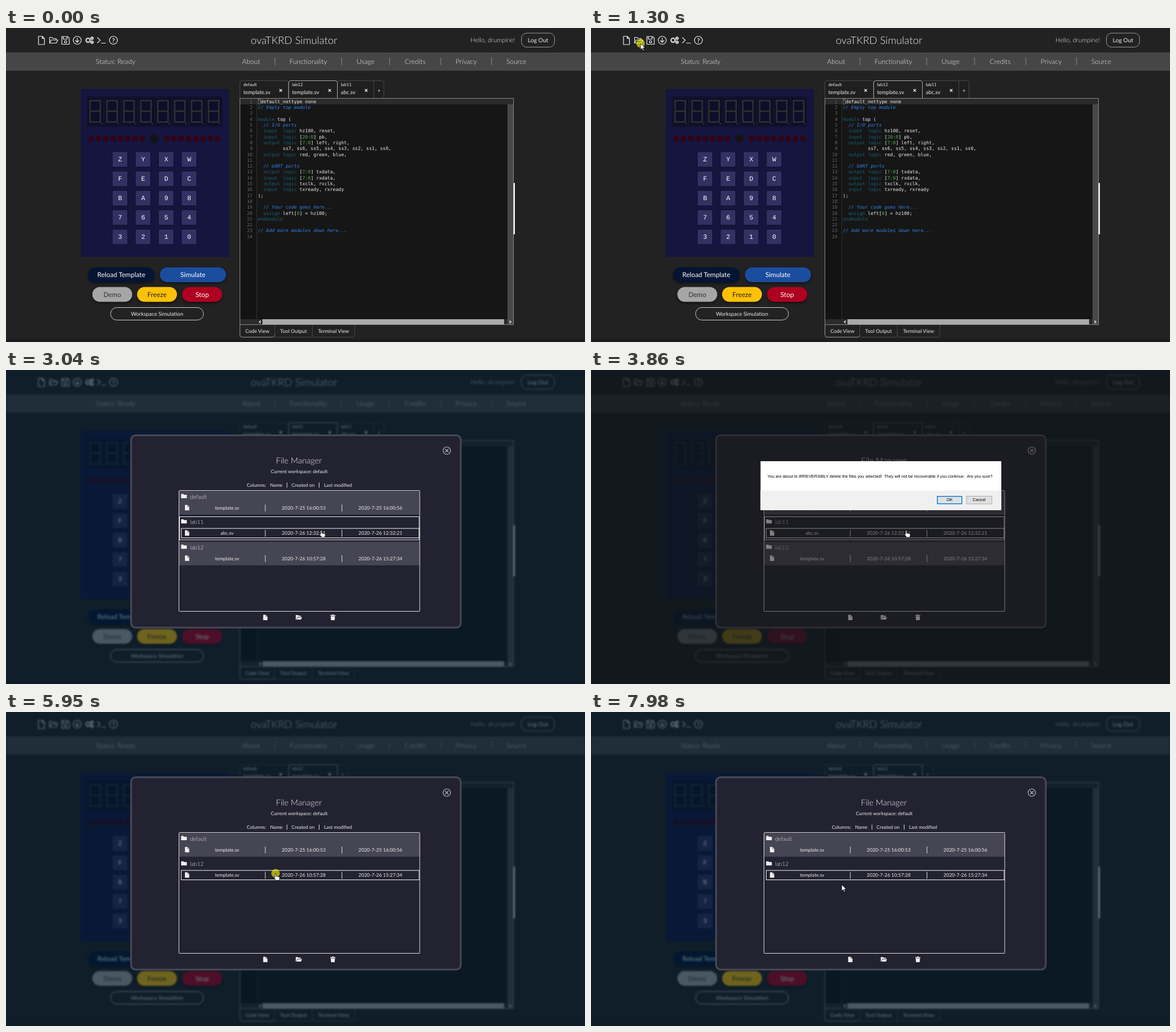
Animation, 1016 px wide and 551 px high, one loop 8000 ms. Source, as an HTML page:

```html
<!DOCTYPE html>
<html lang="en">
<head>
<meta charset="utf-8">
<title>Simulator file manager</title>
<style>
  html, body { margin: 0; width: 100%; height: 100%; overflow: hidden; background: #222; }
  svg { position: absolute; left: 0; top: 0; width: 1016px; height: 551px; }
  text { font-family: Lato, sans-serif; white-space: pre; text-rendering: geometricPrecision; }
  .code text { font: 8.1px "DejaVu Sans Mono", monospace; }
  .key text { font-family: "Liberation Mono", monospace; }
  .dialog text { font-family: "Liberation Sans", sans-serif; }
  .shadow { filter: drop-shadow(0 2px 2px rgba(0, 0, 0, .55)); }
  .line { fill: none; stroke: #eee; stroke-width: 1.2; stroke-linejoin: round; stroke-linecap: round; }
</style>
</head>
<body>
<svg id="page" viewBox="0 0 1016 551"></svg>
<svg id="top" viewBox="0 0 1016 551"></svg>
<script>
const $ = id => document.getElementById(id);
const range = (n, fn) => Array.from({ length: n }, (_, i) => fn(i)).join('');

// Drawing helpers
const rect = (x, y, w, h, fill, more = '') =>
  `<rect x="${x}" y="${y}" width="${w}" height="${h}" fill="${fill}" ${more}/>`;
const frame = (x, y, w, h, stroke, r = 0) => rect(x, y, w, h, 'none', `stroke="${stroke}" rx="${r}"`);
const disc = (x, y, r, fill) => `<circle cx="${x}" cy="${y}" r="${r}" fill="${fill}"/>`;
const path = (d, more = '') => `<path d="${d}" ${more}/>`;
const text = (x, y, s, size, { w = 400, c = '#eee', a = 'start' } = {}) =>
  `<text x="${x}" y="${y}" font-size="${size}" font-weight="${w}" fill="${c}" text-anchor="${a}">${s}</text>`;
const mid = (x, y, s, size, c, w) => text(x, y, s, size, { a: 'middle', c, w });
const cross = (x, y, r) => path(`M${x - r} ${y - r}l${2 * r} ${2 * r}m0 ${-2 * r}l${-2 * r} ${2 * r}`,
  'stroke="#eee" stroke-width="1.3"');

function header() {
  const gear = (x, y, r) =>
    `<circle cx="${x}" cy="${y}" r="${r}"/><circle cx="${x}" cy="${y}" r="${r + 1.2}" stroke-dasharray="1.2 1.5"/>`;
  const icons = '<g class="line">' +
    path('M57 14.5h6.5l4 4v10.500h-10.500zM63.500 14.500v4h4') +
    path('M76.500 26.500v-10h4.500l1.500 2h5.500v2.500M76.500 26.500l3-5.500h11.500l-3 5.500z') +
    path('M98 15h10l3 3v10.500h-13zM100.500 15v4.500h6.500v-4.500') + '<circle cx="104.500" cy="24" r="2"/>' +
    '<circle cx="125" cy="21.500" r="7"/>' + path('M125 17.500v7.500m-3-3l3 3 3-3') +
    gear(144, 21.5, 3) + gear(151, 18, 1.3) + gear(151, 25, 1.3) +
    path('M160.500 17l5 4.500-5 4.500M167.500 26.500h7') +
    '<circle cx="188.500" cy="21.500" r="7"/></g>' + mid(188.5, 25.5, '?', 11, '#eee', 700);
  const nav = [['About', 430], ['Functionality', 530.5], ['Usage', 631], ['Credits', 718], ['Privacy', 807.5], ['Source', 895.5]];
  return rect(0, 0, 1016, 551, '#222') + rect(0, 43, 1016, 32, '#464646') + rect(0, 546, 1016, 5, '#1f1b20') + icons +
    mid(505.5, 28, 'ovaTKRD Simulator', 18.3, '#eee', 300) +
    text(815, 25, 'Hello, drumpine!', 11, { w: 300 }) +
    frame(904.5, 9, 58, 24.5, '#999', 9) + mid(933.5, 25.2, 'Log Out', 10.2) +
    text(157.5, 63, 'Status: Ready', 12, { w: 300 }) +
    nav.map(([s, x]) => mid(x, 63, s, 11.9, '#eee', 300)).join('') +
    [472, 589, 673, 763, 852].map(x => rect(x - .5, 52, 1, 13, '#8a8a8a')).join('');
}

function board() {
  const digit = i => {
    const x = 147.5 + i * 29.7;
    return rect(x - 4, 122, 28, 50, '#0e0e28', 'stroke="#17172f"') +
      path(`M${x} 127.500h18v37.500h-18zM${x} 146h18`, 'fill="none" stroke="#303034" stroke-width="2.500"') +
      disc(x + 20, 168, 1.4, '#303034');
  };
  const leds = x => range(8, i => disc(x + i * 12.8, 194, 5, '#360311'));
  const keys = range(20, i => {
    const x = 186.5 + (i % 4) * 40.4, y = 217 + Math.floor(i / 4) * 34;
    return rect(x, y, 27, 27, '#313163', 'stroke="#0c0c2c"') + mid(x + 13.8, y + 17.3, 'ZYXWFEDCBA9876543210'[i], 11.5, '#fff');
  });
  const pill = (x, y, w, fill, label, c = '#fff') =>
    rect(x, y, w, 26, fill, 'rx="13"') + mid(x + w / 2, y + 17.3, label, 11.7, c);
  return rect(131, 107, 260, 295, '#15153f') + rect(142, 120, 237, 53.5, '#0f0f2d') + range(8, digit) +
    leds(149.5) + disc(260, 194, 7, '#131313') + leds(282) +
    `<g class="key">${keys}</g><g class="shadow">` +
    pill(144, 420, 116.5, '#041533', 'Reload Template') + pill(270, 420, 116, '#1a4d9e', 'Simulate') +
    pill(151.5, 454.5, 70, '#a6a6a6', 'Demo', '#333') + pill(230, 454.5, 70, '#ffc107', 'Freeze', '#222') +
    pill(309, 454.5, 70.5, '#b00020', 'Stop') + '</g>' +
    frame(183.5, 490.5, 163, 22, '#ccc', 11) + mid(265, 505, 'Workspace Simulation', 9.4);
}

const source = `\`default_nettype none
// Empty top module

module top (
  // I/O ports
  input  logic hz100, reset,
  input  logic [20:0] pb,
  output logic [7:0] left, right,
         ss7, ss6, ss5, ss4, ss3, ss2, ss1, ss0,
  output logic red, green, blue,

  // UART ports
  output logic [7:0] txdata,
  input  logic [7:0] rxdata,
  output logic txclk, rxclk,
  input  logic txready, rxready
);

  // Your code goes here...
  assign left[0] = hz100;
endmodule

// Add more modules down here...
`.split('\n');

const colour = line => line.includes('//')
  ? `<tspan fill="#2e84ee" font-style="italic">${line}</tspan>`
  : line.replace(/\b(?:(module|endmodule|input|output|logic|assign)|\d+(?::\d+)?)\b/g,
      (s, word) => `<tspan fill="${word ? '#12627a' : '#4cb050'}">${s}</tspan>`);

function tab(x, w, dir, file, stroke) {
  return path(`M${x} 123v-27q0-3.500 3.500-3.500h${w - 7}q3.500 0 3.500 3.500v27`, `fill="#1f1f1f" stroke="${stroke}"`) +
    text(x + 6, 102.3, dir, 7.7) + text(x + 6, 115.8, file, 9.45) + cross(x + w - 13.5, 109.5, 2.2);
}
const plus = x => path(`M${x} 123v-30.500h14q3.500 0 3.500 3.500v27`, 'fill="#1f1f1f" stroke="#484848"') +
  mid(x + 9, 113, '+', 9);

function editor() {
  const views = [['Code View', 410.5, 61, '#999'], ['Tool Output', 471.5, 66, '#484848'], ['Terminal View', 537.5, 74.5, '#484848']];
  return tab(410.5, 85, 'default', 'template.sv', '#484848') +
    `<g id="extraTab">${tab(581.5, 64, 'lab11', 'abc.sv', '#484848')}${plus(645.5)}</g>` +
    `<g id="fewerTabs">${plus(581.5)}</g>` +
    tab(496, 85.5, 'lab12', 'template.sv', '#aaa') +
    rect(410.5, 123.5, 480, 397, '#161616', 'stroke="#888"') + rect(411, 124, 29, 387, '#131313') +
    rect(411, 124, 479, 10, '#2b2b2b') + rect(439.5, 124, 1, 387, '#333') +
    rect(880, 134, 10, 386, '#484848') + rect(411, 511, 469, 9, '#2b2b2b') + rect(450, 511, 424, 9, '#aaa') +
    path('M447 513.500l-2.500 2.200 2.500 2.200M883.500 513.500l2.500 2.200-2.500 2.200', 'fill="none" stroke="#fff" stroke-width="1.300"') +
    rect(890.5, 272, 2.5, 90, '#f4f4f4') + frame(442.5, 124.5, 4, 9, '#666') +
    '<g class="code">' + source.map((line, i) => {
      const y = 131.8 + i * 10.3;
      return text(432.5, y, i + 1, 8.1, { c: '#666', a: 'end' }) + text(442, y, colour(line), 8.1);
    }).join('') + '</g>' +
    views.map(([s, x, w, c]) => path(`M${x} 521v17.500q0 4 4 4h${w - 8}q4 0 4-4v-17.500`, `fill="none" stroke="${c}"`) +
      mid(x + w / 2, 535.3, s, 8.9)).join('');
}

// File manager
const GROUP = 44.4;
const sheet = (x, y) => path(`M${x} ${y}h4.500l3 3v6.500h-7.500z`, 'fill="#eee"') +
  path(`M${x + 4.5} ${y}v3h3`, 'fill="none" stroke="#555" stroke-width=".7"');
const folder = (x, y) => path(`M${x} ${y}h4l1 1.300h5v6h-10z`, 'fill="#eee"');

const rows = groups => groups.map(([dir, file, made, changed], i) => {
  const y = 212.6 + i * GROUP;
  return (i % 2 ? '' : rect(304, y, 422, 41.3, '#464553')) +
    folder(307.3, y + 5) + text(323, y + 13.2, dir, 9.75, { w: 300 }) + sheet(314, y + 24.2) +
    mid(388, y + 32.3, file, 8.45) + mid(522.5, y + 32.3, made, 8.5) + mid(657, y + 32.3, changed, 8.5) +
    rect(454.5, y + 23.5, 1, 12, '#ddd') + rect(589, y + 23.5, 1, 12, '#ddd');
}).join('');

const files = [
  ['default', 'template.sv', '2020-7-25 16:00:53', '2020-7-25 16:00:56'],
  ['lab11', 'abc.sv', '2020-7-26 12:32:21', '2020-7-26 12:32:21'],
  ['lab12', 'template.sv', '2020-7-26 10:57:28', '2020-7-26 15:27:34'],
];

function manager() {
  const heads = [['Columns:', 422.5], ['Name', 463.5], ['Created on', 501], ['Last modified', 558]];
  return rect(0, 0, 1016, 551, 'rgba(0,28,47,.56)') +
    rect(219.5, 114.5, 578.5, 337.5, '#232230', 'rx="8" stroke="#494856" stroke-width="3"') +
    '<g class="line" stroke-opacity=".75"><circle cx="773.500" cy="141.500" r="6.500"/>' +
    path('M771 139l5 5m0-5l-5 5') + '</g>' +
    mid(514, 164.3, 'File Manager', 14.5, '#eee', 300) + mid(514.5, 180.7, 'Current workspace: default', 8.4) +
    heads.map(([s, x]) => text(x, 204.8, s, 8.35)).join('') +
    rect(492.5, 197.5, 1, 9, '#ddd') + rect(549, 197.5, 1, 9, '#ddd') +
    `<g id="before">${rows(files)}</g><g id="after">${rows([files[0], files[2]])}</g>` +
    frame(303.5, 211.5, 422.5, 212, '#ddd', 1) +
    `<g id="groupLine">${frame(304.5, 257.5, 420.5, 40.5, '#eee')}</g>` +
    `<g id="rowLine">${frame(307.5, 278, 417.5, 16.5, '#f4f4f4')}</g>` +
    `<g id="lastLine">${frame(307.5, 322.4, 417.5, 16.5, '#f4f4f4')}</g>` +
    sheet(451.3, 429.5) +
    path('M508.500 438v-8h4l1 1.300h4v1.700h-6l-2 5zM510 438l2-4.300h7.500l-2 4.300z', 'fill="#eee"') +
    path('M569 430h3v-1h3v1h3v1.500h-9zM569.700 432.300h7.600l-.6 6.700h-6.400z', 'fill="#eee"');
}

const dialog = () => rect(0, 0, 1016, 551, 'rgba(20,20,20,.5)') +
  rect(297.5, 160, 422.5, 86, '#fff') + rect(297.5, 211.5, 422.5, 34.5, '#f0f0f0') +
  text(309.5, 188.5, 'You are about to IRREVERSIBLY delete the files you selected!  They will not be recoverable if you continue.  Are you sure?', 7.27, { c: '#000' }) +
  rect(607.7, 221.7, 43, 13, '#e1e1e1', 'stroke="#0078d7" stroke-width="1.400"') + mid(629.3, 230.3, 'OK', 7.27, '#000') +
  rect(659, 221.5, 44.5, 13.5, '#e1e1e1', 'stroke="#adadad"') + mid(681, 230.3, 'Cancel', 7.27, '#000');

const pointer = '<g id="click"><circle r="7.500" fill="#ff0" opacity=".6"/></g>' +
  path('M0 0v11l2.500-2.300 1.800 3.900 1.800-.8-1.800-3.800h3.500z', 'id="arrow" fill="#fff" stroke="#000" stroke-width=".7"') +
  path('M-1 1q1-1.500 2 0v4.200l5 1q1.500.4 1.300 2l-.8 4.300h-5.500l-3.800-4.800q.2-1.500 1.800-.4z',
    'id="hand" fill="#fff" stroke="#000" stroke-width=".7"');

$('page').innerHTML = header() + board() + editor();
$('top').innerHTML = `<g id="manager">${manager()}</g><g id="dialog" class="dialog">${dialog()}</g><g id="cursor">${pointer}</g>`;

// Motion
const LOOP = 8000, OPEN = 1400, DELETED = 4130;
const moves = [[240, 362, 523], [500, 260, 330], [720, 120, 110], [870, 48, 46], [1040, 87, 27], [1450, 87, 27],
  [1840, 548, 322], [1990, 554, 269], [2180, 553, 281], [3910, 553, 281], [4150, 553, 284], [4570, 553, 284],
  [4850, 520, 323], [5320, 473, 283], [5950, 473, 283], [6350, 455, 320], [6740, 444, 296], [7160, 440, 280],
  [7600, 440, 280], [7800, 440, 344], [7980, 440, 303]];
const rowGlow = [[2050, 0], [2180, 1], [4130, 1], [4131, 0], [4289, 0], [4290, 1], [4640, 1], [4800, 0],
  [5150, 0], [5300, 1], [6150, 1], [6300, 0], [6820, 0], [7000, 1]];
const clicks = [[1300, 1400], [2450, 2600], [5400, 6050]];

const linear = k => k, smooth = k => k * k * (3 - 2 * k);
function track(keys, t, ease = linear) {
  const i = keys.findIndex(k => k[0] > t);
  if (i < 1) return (i ? keys[keys.length - 1] : keys[0]).slice(1);
  const [a, b] = [keys[i - 1], keys[i]], k = ease((t - a[0]) / (b[0] - a[0]));
  return a.slice(1).map((v, j) => v + (b[j + 1] - v) * k);
}
const show = (id, on) => $(id).setAttribute('opacity', +on);

function draw(t) {
  const [open] = track([[OPEN, 0], [1850, 1]], t);
  const [x, y] = track(moves, t, smooth);
  const deleted = t >= DELETED;
  const overRow = t > 1650 && x > 304 && x < 726 && y > 212 && y < (deleted ? 298 : 342);

  $('page').style.filter = open ? `blur(${1.7 * open}px)` : 'none';
  show('manager', open);
  show('extraTab', !deleted);
  show('fewerTabs', deleted);
  show('before', !deleted);
  show('after', deleted);
  show('rowLine', track(rowGlow, t)[0]);
  show('lastLine', track([[1750, 0], [1840, .7], [1900, .7], [2100, 0]], t)[0]);
  show('groupLine', deleted ? 0 : track([[2450, 0], [2650, 1]], t)[0]);
  show('dialog', t >= 3300 && t < 3910);

  $('cursor').setAttribute('transform', `translate(${x} ${y})`);
  show('cursor', t >= 240);
  show('click', clicks.some(([a, b]) => t >= a && t < b));
  show('hand', overRow);
  show('arrow', !overRow);
}

const start = performance.now();
function tick() {
  draw((performance.now() - start) % LOOP);
  requestAnimationFrame(tick);
}
tick();
</script>
</body>
</html>
```
